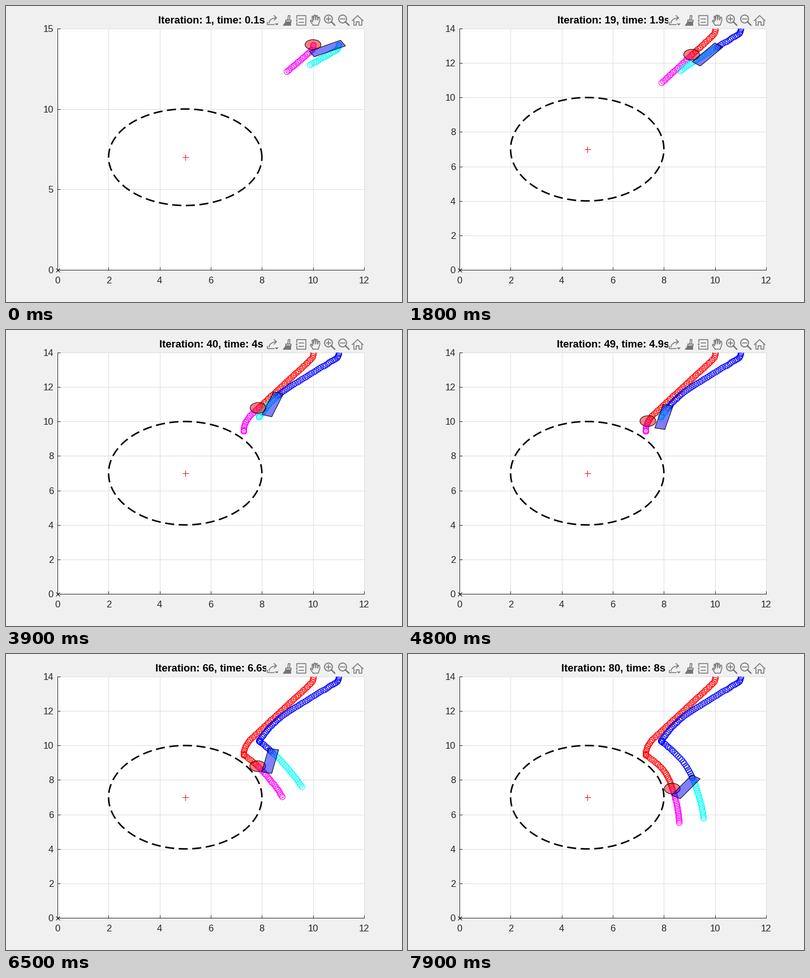
These frames come from a looping animation (700 px wide and 525 px high, 8 s). A matplotlib script:

```python
import numpy as np
import matplotlib.pyplot as plt
from matplotlib.animation import FuncAnimation
from matplotlib.patches import Circle, Polygon, Rectangle

PX = 0.72  # points per pixel at 100 dpi
W, H, N, HORIZON, STOP = 700, 525, 80, 20, 55
BACK, DARK, ICON = "#f0f0f0", "#262626", "#757575"

plt.rcParams["font.family"] = "Liberation Sans"


def ease(t, start, end):
    u = np.clip((t - start) / (end - start), 0, 1)
    return u * u * (3 - 2 * u)


def disc_course(t):
    """Direction of travel in degrees: swing in, straighten, turn off, round the obstacle."""
    return (-90 - 36 * ease(t, 0, 5) + 36 * ease(t, 42, 55)
            + 42 * (t >= STOP) - 29 * ease(t, 58, 78))


def car_course(t):
    return (-90 - 48 * ease(t, 0, 6) + 26 * ease(t, 25, 58)
            + 62.5 * (t >= STOP) - 26 * ease(t, 58, 82))


def disc_speed(t):
    return 0.1 + 0 * t


def car_speed(t):
    return 0.074 + 0.022 * ease(t, 0, 18) + 0.03 * ease(t, 62, 68)


def car_heading(t):
    return 209 + 51.5 * np.sin(np.pi / 2 * min(t / 64, 1)) - 26 * ease(t, 62, 82)


def walk(start, angles, steps):
    a = np.radians(angles)
    moves = np.column_stack([np.cos(a), np.sin(a)]) * np.reshape(steps, (-1, 1))
    return np.vstack([start, start + np.cumsum(moves, axis=0)])


class Robot:
    def __init__(self, start, course, speed, stride):
        t = np.arange(N) + 0.5
        pause = 1 - np.exp(-((t - STOP) / 1.5) ** 2)
        self.path = walk(np.array(start), course(t), speed(t) * pause)
        self.course, self.stride = course, stride

    def trail(self, n):
        return self.path[:n + 1]

    def plan(self, n):
        """Known path up to the stop; afterwards a slightly bent look ahead."""
        k = np.arange(HORIZON + 1)
        if n < STOP:
            return self.path[np.minimum(n + k, STOP)]
        return walk(self.path[n], self.course(n) - 0.5 * k[1:], self.stride)


disc = Robot((10.0, 14.0), disc_course, disc_speed, 0.1)
car = Robot((11.0, 14.0), car_course, car_speed, 0.114)


def car_corners(n):
    a = np.radians(car_heading(n))
    body = np.array([(-0.2, -0.2), (1.2, -0.2), (1.2, 0.2), (-0.2, 0.2)])
    turn = np.array([(np.cos(a), np.sin(a)), (-np.sin(a), np.cos(a))])
    return car.path[n] + body @ turn


fig = plt.figure(figsize=(W / 100, H / 100), dpi=100, facecolor=BACK)
ax = fig.add_axes([91 / W, 57 / H, 542 / W, 428 / H], facecolor="white")
ax.set_xlim(0, 12)
ax.set_xticks(range(0, 13, 2))
ax.set_axisbelow(True)
ax.grid(color="#dedede", lw=PX, clip_on=False)
ax.tick_params(direction="in", length=5 * PX, width=PX, color=DARK,
               labelcolor=DARK, labelsize=16.67 * PX)
ax.tick_params(axis="x", pad=11.5 * PX)
ax.tick_params(axis="y", pad=7 * PX)
for side, spine in ax.spines.items():
    spine.set(visible=side in ("left", "bottom"), color=DARK, linewidth=PX)

th = np.linspace(0, 2 * np.pi, 200)
ax.plot(5 + 3 * np.cos(th), 7 + 3 * np.sin(th), color="black", lw=2.67 * PX,
        ls=(0, (6, 3)), dash_capstyle="butt")
ax.plot(5, 7, "+", color="red", ms=11 * PX, mew=PX)
ax.plot(0, 0, "x", color="black", ms=7 * PX, mew=PX, clip_on=False, zorder=5)


def rings(color):
    return ax.plot([], [], "o", mfc="none", mec=color, ms=10 * PX, mew=1.1 * PX,
                   snap=False)[0]


marks = [(rings("red"), disc.trail), (rings("blue"), car.trail),
         (rings("magenta"), disc.plan), (rings("cyan"), car.plan)]
style = dict(ec="black", lw=PX, zorder=4)
disc_body = ax.add_patch(Circle((0, 0), 0.31, fc=(1, 0, 0, 0.5), **style))
car_body = ax.add_patch(Polygon(np.zeros((4, 2)), fc=(0, 0, 1, 0.5), **style))

# Title and toolbar live in a pixel-sized layer
ui = fig.add_axes([0, 0, 1, 1])
ui.set(xlim=(0, W), ylim=(H, 0))
ui.axis("off")
title = ui.text(363, 31, "", ha="center", va="baseline", weight="bold",
                size=18.33 * PX, color="black")
ui.add_patch(Rectangle((460, 13), 173, 24, fc=BACK, ec="none", zorder=4))


def stroke(*pts, lw=1.5):
    x, y = zip(*pts)
    ui.plot(x, y, color=ICON, lw=lw * PX, zorder=5, solid_joinstyle="round")


def fill(*pts):
    ui.add_patch(Polygon(pts, fc=ICON, ec="none", zorder=5))


def export_icon(x):
    stroke((x - 9, 29), (x - 9, 33), (x + 3, 33))
    u = np.linspace(0, np.pi / 2, 8)
    stroke(*zip(x + 7 - 13 * np.cos(u), 30 - 9 * np.sin(u)))
    stroke((x + 3, 17), (x + 7, 21), (x + 3, 25))
    fill((x + 4, 31), (x + 11, 31), (x + 7.5, 34.5))


def brush_icon(x):
    stroke((x, 25), (x + 1, 17), (x + 4, 17), (x + 3, 25))
    stroke((x - 3, 25), (x + 6, 25), (x + 6, 28), (x - 4, 28), (x - 3, 25))
    fill((x - 4, 28), (x + 6, 28), (x + 6, 34.5), (x - 9, 34.5))


def tip_icon(x):
    stroke((x - 8, 22), (x - 8, 17), (x + 8, 17), (x + 8, 34), (x - 8, 34), (x - 8, 29))
    for y in (22.5, 28.5):
        stroke((x - 4, y), (x + 4, y))
    fill((x - 10, 25.5), (x - 7, 23), (x - 7, 28))


def hand_icon(x):
    outline = [(x - 4, 34), (x - 9, 27), (x - 8, 25), (x - 5, 28)]
    for i, top in enumerate((18, 16, 17, 20)):
        left = x - 6 + 3.7 * i
        outline += [(left, top), (left + 2, top), (left + 2.8, 25)]
    stroke(*outline, (x + 5, 34), (x - 4, 34))


def zoom_icon(x, plus):
    ui.add_patch(Circle((x, 23), 7, fc="none", ec=ICON, lw=1.7 * PX, zorder=5))
    stroke((x + 5, 28), (x + 11, 34), lw=2.4)
    stroke((x - 4, 23), (x + 4, 23))
    if plus:
        stroke((x, 19), (x, 27))


def home_icon(x):
    stroke((x - 9.5, 26), (x, 17), (x + 9.5, 26))
    for s in (-1, 1):
        stroke((x + 7 * s, 25), (x + 7 * s, 34), (x + 2.5 * s, 34),
               (x + 2.5 * s, 28), (x, 28))


export_icon(471)
brush_icon(498)
tip_icon(522)
hand_icon(547)
zoom_icon(570, True)
zoom_icon(595, False)
home_icon(621.5)


def draw(n):
    for ring, points in marks:
        ring.set_data(*points(n).T)
    center, corners = disc.path[n], car_corners(n)
    disc_body.center = tuple(center)
    car_body.set_xy(corners)
    tall = max(center[1] + disc_body.radius, corners[:, 1].max()) > 14
    top, step = (15, 5) if tall else (14, 2)
    ax.set_ylim(0, top)
    ax.set_yticks(range(0, top + 1, step))
    title.set_text(f"Iteration: {n + 1}, time: {(n + 1) / 10:g}s")
    return []


anim = FuncAnimation(fig, draw, frames=N, interval=100, repeat=True,
                     repeat_delay=0, init_func=lambda: draw(0), blit=False)
plt.show()
```
